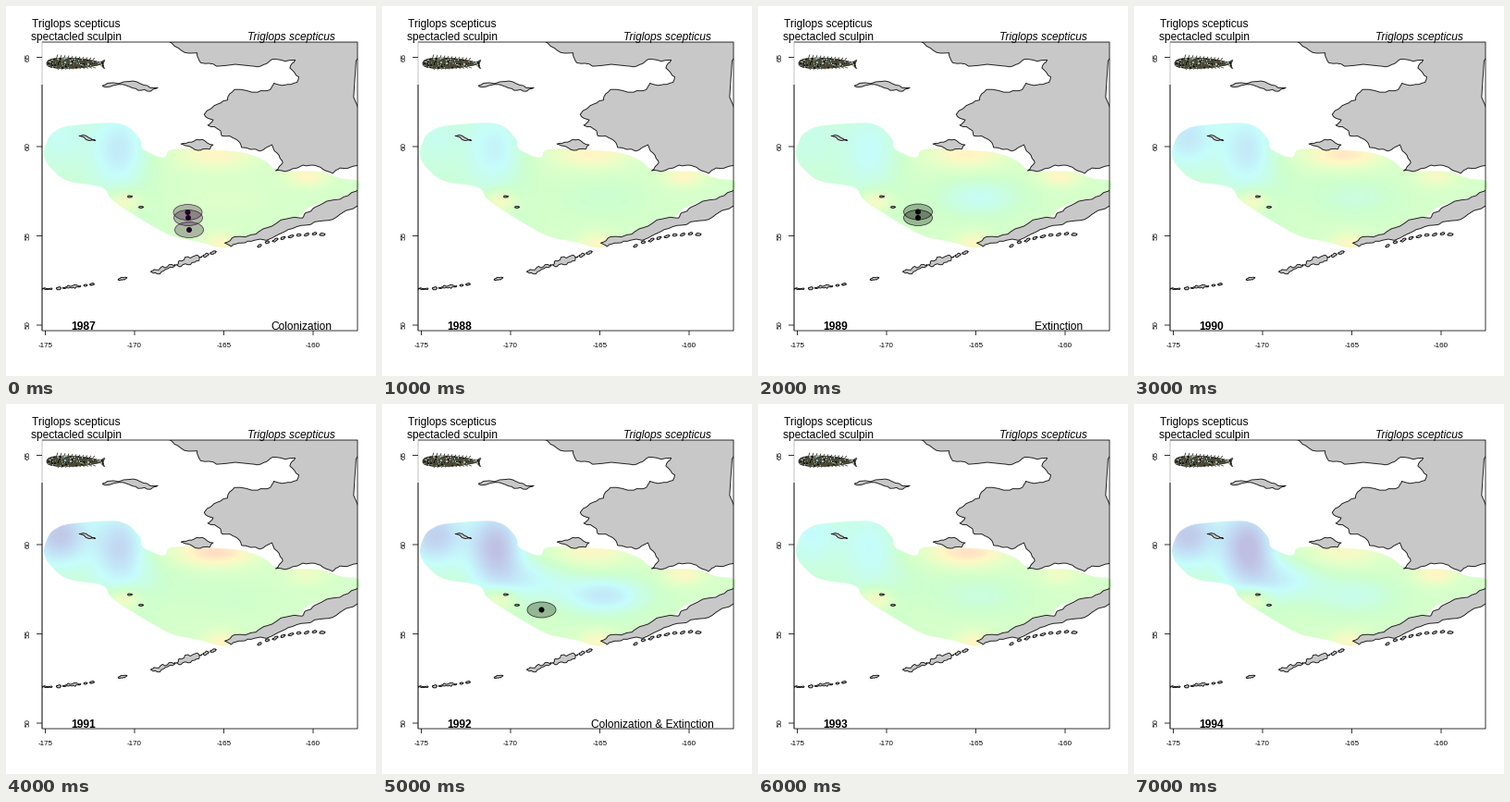
Write a matplotlib script that moves like this. It is 400 px wide and 400 px high and loops after 8000 ms.

```python
import numpy as np
import matplotlib.pyplot as plt
from matplotlib.animation import FuncAnimation
from matplotlib.colors import LinearSegmentedColormap
from matplotlib.patches import Ellipse, Polygon, Rectangle

PX = 0.72  # points per pixel at 100 dpi
LEFT, RIGHT, TOP, BOTTOM = 39, 380, 39, 351
plt.rcParams["font.family"] = "Liberation Sans"

fig = plt.figure(figsize=(4, 4), dpi=100, facecolor="white")
ax = fig.add_axes([0, 0, 1, 1])
ax.set_xlim(0, 400)
ax.set_ylim(400, 0)
ax.axis("off")
rng = np.random.default_rng(7)
map_area = Rectangle((LEFT, TOP), RIGHT - LEFT, BOTTOM - TOP,
                     transform=ax.transData)


def geo(lon, lat):
    """Longitude and latitude to stage pixels."""
    return 139 + 19.3 * (lon + 170), 248.5 - 19.3 * (lat - 55)


def rough(points, amount):
    """Closed outline with small random bends between the key points."""
    pts = np.asarray(points, float)
    for _ in range(2):
        step = np.roll(pts, -1, axis=0) - pts
        normal = np.c_[-step[:, 1], step[:, 0]]
        bend = rng.uniform(-amount, amount, (len(pts), 1))
        mid = pts + step / 2 + normal * bend
        pts = np.stack([pts, mid], axis=1).reshape(-1, 2)
    return pts


def rounded(points):
    """Closed outline with its corners cut twice."""
    pts = np.asarray(points, float)
    for _ in range(2):
        nxt = np.roll(pts, -1, axis=0)
        pts = np.stack([0.8 * pts + 0.2 * nxt, 0.2 * pts + 0.8 * nxt],
                       axis=1).reshape(-1, 2)
    return pts


def land(points, amount=0.13):
    shape = Polygon(rough(points, amount), fc="#c8c8c8", ec="#1c1c1c",
                    lw=0.95 * PX, joinstyle="round", zorder=3)
    ax.add_patch(shape)
    shape.set_clip_path(map_area)


def coast(*places):
    land([geo(*place) for place in places])


def islet(x, y, w, h, tilt=0):
    """Small island whose long axis rises to the right by tilt degrees."""
    t = np.linspace(0, 2 * np.pi, 8, endpoint=False)
    u, v = w / 2 * np.cos(t), h / 2 * np.sin(t)
    c, s = np.cos(np.radians(tilt)), np.sin(np.radians(tilt))
    land(np.c_[x + u * c + v * s, y - u * s + v * c], 0.3)


def label(x, y, text, size=12, **kw):
    kw = {"ha": "center", "va": "baseline", **kw}
    return ax.text(x, y, text, fontsize=size * PX, color="black", **kw)


def line(xs, ys, color="black", width=0.8, z=6):
    ax.plot(xs, ys, color=color, lw=width * PX, zorder=z, snap=False,
            solid_capstyle="butt", scalex=False, scaley=False)


# Mainland, peninsula and the larger islands
coast((-168.1, 65.9), (-167.4, 65.4), (-166.5, 65.25), (-166.3, 64.7),
      (-165.4, 64.5), (-163.3, 64.5), (-162.6, 64.65), (-162.1, 64.9),
      (-161.0, 64.85), (-161.3, 64.4), (-160.8, 63.9), (-160.9, 63.6),
      (-161.6, 63.45), (-162.2, 63.55), (-162.4, 63.2), (-163.1, 63.05),
      (-164.4, 63.2), (-164.8, 62.6), (-165.3, 62.4), (-166.1, 61.8),
      (-165.6, 61.5), (-165.9, 61.2), (-165.2, 60.9), (-165.1, 60.6),
      (-164.3, 60.4), (-164.0, 59.95), (-163.0, 59.75), (-162.3, 60.1),
      (-161.9, 59.5), (-161.7, 59.1), (-162.1, 58.65), (-161.4, 58.65),
      (-160.9, 58.8), (-160.2, 58.95), (-159.6, 58.85), (-158.9, 58.5),
      (-158.5, 58.8), (-157, 58.9), (-156.5, 66.5))
coast((-157, 58.0), (-157.6, 57.5), (-158.5, 57.05), (-159.9, 56.6),
      (-160.4, 56.3), (-160.6, 56.0), (-161.5, 55.95), (-162.6, 55.45),
      (-163.2, 55.1), (-164.4, 54.95), (-164.95, 54.6), (-164.6, 54.4),
      (-164.0, 54.6), (-163.3, 54.75), (-162.0, 55.05), (-161.4, 55.35),
      (-160.4, 55.6), (-159.4, 55.85), (-158.5, 56.2), (-157, 56.8))
coast((-171.8, 63.4), (-171.5, 63.55), (-170.3, 63.65), (-169.5, 63.45),
      (-168.7, 63.3), (-169.1, 63.1), (-169.8, 63.15), (-170.4, 63.4),
      (-171.4, 63.35))
coast((-167.4, 60.15), (-166.8, 60.25), (-166.2, 60.4), (-165.6, 60.1),
      (-165.8, 59.85), (-166.3, 59.8), (-166.9, 60.0))
coast((-173.1, 60.6), (-172.7, 60.6), (-172.2, 60.35), (-172.6, 60.35))

# Island arc, its tilt following the curve
for x, w, h in [(43, 14, 1.5), (57, 5, 3), (71, 20, 2), (86, 4, 2),
                (93, 5, 2), (126, 10, 2.5), (170, 28, 5), (198, 29, 9),
                (216, 7, 3), (224, 7, 3)]:
    s = (x - 40) / 180
    islet(x, 306 - 38 * s ** 1.65, w, h,
          np.degrees(np.arctan(0.35 * s ** 0.65)))
for x, y in [(134, 206), (146, 217.5)]:
    islet(x, y, 5, 2)
for x in np.linspace(274, 342, 9):
    islet(x, 246 + 13 * ((345 - x) / 71) ** 2 + rng.uniform(-1, 1),
          rng.uniform(4, 7), 2.5, rng.uniform(0, 30))

# Temperature field: a mild slope plus warm and cold pools (x, y, rx, ry)
pools = [(58, 142, 24, 24), (124, 155, 22, 32), (165, 190, 32, 18),
         (240, 207, 36, 16), (226, 160, 34, 13), (326, 184, 18, 9)]
strength = {
    1987: [-0.12, -0.28, 0, 0.06, 0.26, 0.26],
    1989: [-0.08, -0.18, 0, -0.22, 0.28, 0.26],
    1991: [-0.45, -0.38, -0.06, -0.04, 0.40, 0.16],
    1992: [-0.40, -0.52, -0.22, -0.36, 0.24, 0.25],
    1993: [-0.16, -0.18, -0.05, -0.13, 0.38, 0.18],
    1994: [-0.44, -0.56, -0.25, -0.18, 0.22, 0.28],
}
for year in (1988, 1990):
    strength[year] = np.add(strength[year - 1], strength[year + 1]) / 2

gx, gy = np.meshgrid(np.arange(40, 384, 2), np.arange(124, 268, 2))


def pool(x, y, rx, ry):
    return np.exp(-(((gx - x) / rx) ** 2 + ((gy - y) / ry) ** 2) / 1.6)


slope = 0.51 + 0.1 * np.clip((gx - 100) / 80, 0, 1)
slope += 0.3 * pool(127, 211, 14, 9) + 0.25 * pool(233, 258, 16, 11)
shapes = np.array([pool(*p) for p in pools])


def temperature(year):
    return slope + np.tensordot(strength[year], shapes, axes=1)


pastel = LinearSegmentedColormap.from_list("pastel", [
    (0, "#bfbfe3"), (0.2, "#c3e0f6"), (0.36, "#c6fdfb"), (0.55, "#cdffcd"),
    (0.72, "#e6ffc8"), (0.87, "#fff7c4"), (1, "#ffe0c6")])
survey = Polygon(rounded([
    (40, 158), (47, 139), (62, 130), (95, 127), (120, 126), (134, 131),
    (147, 146), (146, 155), (172, 166), (176, 153), (250, 157), (266, 161),
    (280, 167), (293, 179), (340, 178), (362, 187), (382, 188), (382, 201),
    (326, 217), (318, 228), (285, 242), (240, 262), (228, 261), (210, 255),
    (180, 250), (150, 233), (113, 210), (107, 195), (64, 190), (44, 171),
]), transform=ax.transData)
field = ax.imshow(temperature(1987), cmap=pastel, vmin=0, vmax=1,
                  extent=(39, 383, 267, 123), interpolation="bilinear",
                  aspect="auto", zorder=1)
field.set_clip_path(survey)
ax.set_xlim(0, 400)
ax.set_ylim(400, 0)

# Frame and axes
line([LEFT, RIGHT, RIGHT, LEFT], [TOP, TOP, BOTTOM, BOTTOM])
line([LEFT, LEFT], [TOP, 85], "#999999", 0.6)
line([LEFT, LEFT], [85, BOTTOM], width=1)
for i in range(4):
    x, y = 42.5 + 96.5 * i, 345 - 96.5 * i
    line([x, x], [BOTTOM, 356])
    line([33, LEFT], [y, y])
    label(x, 369, str(-175 + 5 * i), 8)
    label(24.5, y, str(50 + 5 * i), 8, rotation=90, va="center")

# Fish: tapered body, fan tail, spiny fins and seeded mottling
t = np.linspace(0, 1, 30)
xs = 44 + 58 * t
half = 11.5 * t ** 0.45 * (1 - t) ** 0.85 + 1
body = np.r_[np.c_[xs, 62 - half],
             [(107, 58), (105, 63), (106.5, 68)],
             np.c_[xs, 62.5 + half * 0.85][::-1]]
fish = Polygon(body, fc="#4a4938", ec="#1c1b14", lw=0.6 * PX, zorder=7)
ax.add_patch(fish)
for x in range(54, 96, 4):
    rise = 4 * (96 - x) / 42
    line([x, x + 2], [58, 56.5 - rise], "#2c2b1e", 0.8, 7)
    line([x, x + 3], [66, 67 + rise / 2], "#55513b", 0.8, 7)
tones = np.array(["#0d0d0a", "#1d1c14", "#77745a", "#a9b8ae", "#93b4bd"])
spots = ax.scatter(rng.uniform(44, 107, 170), rng.uniform(54, 70, 170), s=1.2,
                   c=tones[rng.integers(0, 5, 170)], marker="s", lw=0,
                   zorder=8)
spots.set_clip_path(fish)

# Titles
label(76, 23, "Triglops scepticus")
label(76, 37.5, "spectacled sculpin")
label(308, 37, "Triglops scepticus", style="italic")
year_text = label(84, 350, "", weight="bold")
event_text = label(319, 350, "")

# Events: caption, its centre, marker tint, positions
PLUM, INK = (0.2, 0.02, 0.22), (0, 0, 0)
events = {
    1987: ("Colonization", 319, PLUM, [(196.5, 223), (197, 229), (198, 242)]),
    1989: ("Extinction", 325, INK, [(173, 222.5), (173, 229)]),
    1992: ("Colonization & Extinction", 292.5, INK, [(172.5, 222.5)]),
}
rings = [ax.add_patch(Ellipse((0, 0), 31, 17, lw=0.8 * PX, zorder=4))
         for _ in range(3)]
dots = [ax.add_patch(Ellipse((0, 0), 6, 6, lw=0, zorder=5))
        for _ in range(3)]


def draw(i):
    year = 1987 + i
    field.set_data(temperature(year))
    year_text.set_text(str(year))
    caption, x, tint, places = events.get(year, ("", 319, INK, []))
    event_text.set_text(caption)
    event_text.set_x(x)
    for k, (ring, dot) in enumerate(zip(rings, dots)):
        shown = k < len(places)
        ring.set_visible(shown)
        dot.set_visible(shown)
        if shown:
            ring.set_center(places[k])
            dot.set_center(places[k])
            ring.set_facecolor((*tint, 0.28))
            ring.set_edgecolor((*tint, 0.75))
            dot.set_facecolor([c * 0.6 for c in tint])
    return [field, year_text, event_text, *rings, *dots]


anim = FuncAnimation(fig, draw, frames=8, interval=1000, repeat=True,
                     repeat_delay=0, blit=False)
plt.show()
```
